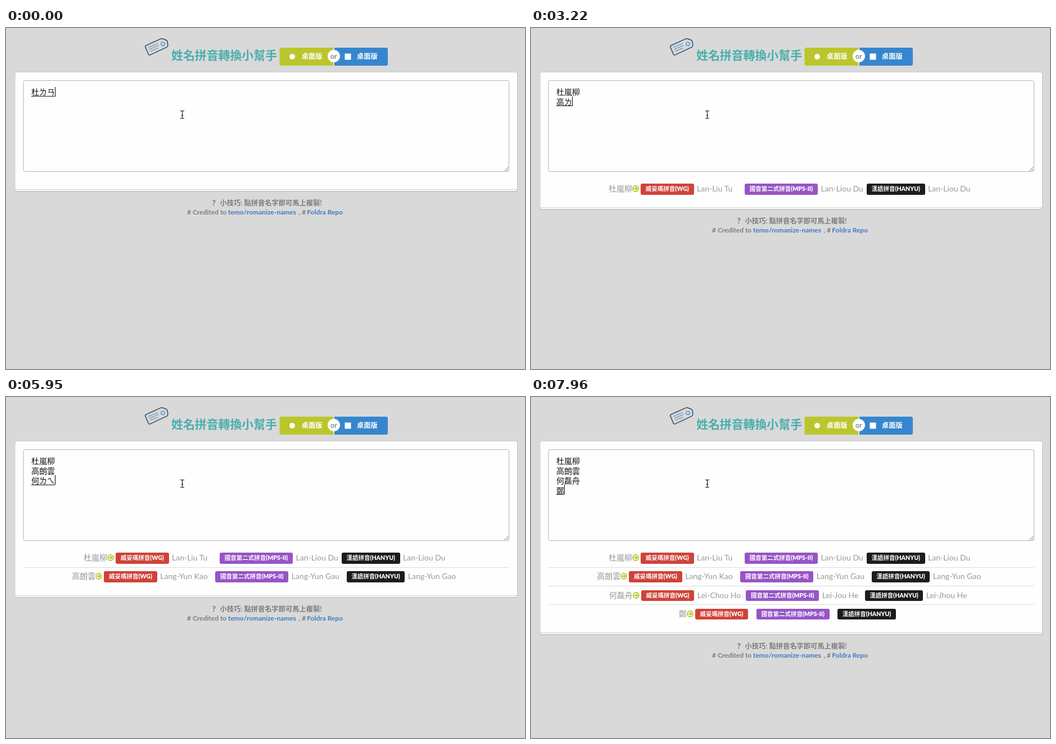
An HTML page for the animation above (8 s loop, 923 by 607 pixels).

```html
<!DOCTYPE html>
<html lang="zh-Hant">
<head>
<meta charset="utf-8">
<title>姓名拼音轉換小幫手</title>
<style>
html, body { margin: 0; width: 100%; height: 100%; overflow: hidden; background: #d9d9d9; }
body, text { font-family: Lato, "Noto Sans CJK TC", "Noto Sans CJK JP", "Noto Sans CJK", sans-serif; }
svg { display: block; }
#stage { position: absolute; left: 0; top: 0; }
.title { font-size: 20.9px; font-weight: 700; fill: #4aafab; }
.button { font-size: 12.25px; font-weight: 700; fill: #fff; }
.or { font-size: 12.25px; font-weight: 700; fill: #8a8a8a; text-anchor: middle; }
.foot { font-size: 12.25px; font-weight: 700; fill: #7d7d7d; }
.credit { font-size: 12px; }
.link { fill: #4179c2; }
#typed text { font-size: 14px; fill: #111; }
.row {
  position: absolute; left: 31px; width: 864px; height: 33px;
  display: flex; justify-content: center; align-items: center;
  font-size: 14px; line-height: 20px; color: #999; white-space: pre;
}
.row + .row::before {
  content: ""; position: absolute; left: 0; right: 0; top: 0; height: 1px; background: #dcdcdc;
}
.row svg { width: 12px; height: 12px; margin-right: 3px; flex: none; }
.tag {
  flex: none; height: 19.5px; margin-top: 1.5px; border-radius: 3px; color: #fff;
  font-size: 10.5px; line-height: 19.5px; font-weight: 900; text-align: center;
}
.roman { flex: none; margin: 0 9px 0 5.5px; }
</style>
</head>
<body>
<svg id="stage" width="923" height="607" viewBox="0 0 923 607">
  <!-- price tag -->
  <g fill="none" stroke-linecap="round" stroke-linejoin="round">
    <path d="M249 31.2 L274.5 19.6 Q276.8 18.5 279 19.3 L284.8 21.5 Q286.8 22.4 287.1 24.4 L287.8 30.3 Q288 33 285.8 34.1 L256.5 47.9 Q254.3 48.9 253.3 46.7 L247.9 34.1 Q247.2 32 249 31.2 Z"
      stroke="#34495e" stroke-width="1.5"/>
    <g stroke="#4b94cf" stroke-width="1.1">
      <path d="M253.5 34.5 L269.5 27.5 M255 38 L271.5 30.8 M256.7 41.5 L270 35.7"/>
      <circle cx="279" cy="28.3" r="3.2" stroke-width="1.4"/>
    </g>
  </g>
  <text class="title" x="294" y="55.7">姓名拼音轉換小幫手</text>

  <!-- buttons -->
  <rect x="581" y="35" width="4" height="32" fill="#e3e6bd"/>
  <path d="M582 35 H489.5 a3 3 0 0 0 -3 3 V64 a3 3 0 0 0 3 3 H582 Z" fill="#bbc62c"/>
  <path d="M584 35 H676 a3 3 0 0 1 3 3 V64 a3 3 0 0 1 -3 3 H584 Z" fill="#3686cf"/>
  <circle cx="509" cy="51" r="5" fill="#fff"/>
  <rect x="602.5" y="45.5" width="11" height="11" fill="#fff"/>
  <text class="button" x="525.8" y="55.2">桌面版</text>
  <text class="button" x="624" y="55.2">桌面版</text>
  <circle cx="583" cy="50" r="11" fill="#fff"/>
  <text class="or" x="582.7" y="54.6">or</text>

  <!-- panel -->
  <rect id="shade" x="16" y="78.5" width="894" rx="3" fill="#c2c2c2"/>
  <rect id="panel" x="16.5" y="79" width="892.5" rx="3" fill="#fefefe"/>
  <rect id="seam" x="17" width="892" height="1" fill="#cfcfcf"/>
  <rect x="31" y="93.5" width="863.5" height="162" rx="3" fill="#fefefe" stroke="#b4b4b4"/>
  <path d="M886.5 254.5 L893.5 247.5 M890.5 254.5 L893.5 251.5" stroke="#777" fill="none"/>
  <g id="typed"></g>
  <rect id="underline" x="45" height="1" fill="#111"/>
  <rect id="caret" width="1" height="17" fill="#000"/>

  <!-- mouse pointer -->
  <path d="M310 147.5 h2.2 l1.3 1 l1.3 -1 h2.2 M313.5 148.5 V160 M310 161 h2.2 l1.3 -1 l1.3 1 h2.2 M311.8 155.5 h3.4"
    fill="none" stroke="#111" stroke-width="1.1"/>

  <g id="footer">
    <text class="foot" x="366.5" y="25.8" style="font-weight:900;font-size:13.5px">?</text>
    <text class="foot" x="380.5" y="25.8">小技巧: 點拼音名字即可馬上複製!</text>
    <g class="foot credit">
      <text x="322" y="42.2"># Credited to</text>
      <text class="link" x="395" y="42.2">temo/romanize-names</text>
      <text x="520.5" y="42.2">, #</text>
      <text class="link" x="535.3" y="42.2">Foldra Repo</text>
    </g>
  </g>
</svg>
<div id="rows"></div>

<script>
const LOOP = 8000;
const TAGS = [
  ['威妥瑪拼音(WG)', '#cf4339', 94.5],
  ['國音第二式拼音(MPS-II)', '#9754c6', 130],
  ['漢語拼音(HANYU)', '#1b1c1d', 103.5],
];
// full name, romanizations, column widths of a finished row
const NAMES = [
  ['杜嵐柳', ['Lan-Liu Tu', 'Lan-Liou Du', 'Lan-Liou Du'], [76, 72.5, 73]],
  ['高朗雲', ['Lang-Yun Kao', 'Lang-Yun Gau', 'Lang-Yun Gao'], [89, 89, 85]],
  ['何磊舟', ['Lei-Chou Ho', 'Lei-Jou He', 'Lei-Jhou He'], [77.5, 67, 75.5]],
  ['鄭', ['', '', ''], []],
];
// time, line, committed text, composing text, characters in the result row, caret hidden
const STEPS = [
  [0, 0, '', '杜ㄌㄢ', 0],
  [180, 0, '', '杜ㄌㄢ', 0, true],
  [330, 0, '', '杜嵐', 0],
  [420, 0, '', '杜嵐', 2],
  [960, 0, '杜嵐', '', 2],
  [1220, 0, '杜嵐', 'ㄌ一', 0],
  [1400, 0, '杜嵐', 'ㄌ一ㄡ', 0],
  [1520, 0, '杜嵐', '柳', 3],
  [2060, 0, '杜嵐柳', '', 3],
  [2240, 1, '', '', 0],
  [2770, 1, '', 'ㄍ', 0],
  [2860, 1, '', 'ㄍㄠ', 0],
  [2950, 1, '', '高', 0],
  [3040, 1, '', '高', 1],
  [3220, 1, '', '高ㄌ', 0],
  [3490, 1, '', '高ㄌㄤ', 0],
  [3610, 1, '', '高朗', 2],
  [3880, 1, '', '高朗ㄩ', 0],
  [3970, 1, '', '高朗ㄩㄣ', 0],
  [4050, 1, '', '高朗雲', 3],
  [4320, 1, '高朗雲', '', 3],
  [4620, 2, '', '', 0],
  [4880, 2, '', 'ㄏ', 0],
  [4970, 2, '', 'ㄏㄜ', 0],
  [5050, 2, '', '何', 1],
  [5590, 2, '', '何', 1, true],
  [5770, 2, '', '何ㄌ', 1],
  [5860, 2, '', '何ㄌ', 0],
  [5950, 2, '', '何ㄌㄟ', 0],
  [6210, 2, '', '何磊', 2],
  [6570, 2, '', '何磊ㄓ', 0],
  [6780, 2, '', '何磊ㄓㄡ', 0],
  [6900, 2, '', '何磊舟', 3],
  [7070, 2, '何磊舟', '', 3],
  [7520, 3, '', '', 0],
  [7700, 3, '', 'ㄓ', 0],
  [7790, 3, '', 'ㄓㄥ', 0],
  [7960, 3, '', '鄭', 1],
];
const ARROW = `<svg viewBox="0 0 12 12" fill="none" stroke="#bbc62c" stroke-width="1.8">
  <circle cx="6" cy="6" r="5"/><path d="M2.8 6 H8.4 M6 3.4 L8.6 6 L6 8.6"/></svg>`;

const $ = id => document.getElementById(id);
function set(id, attrs) {
  for (const key in attrs) $(id).setAttribute(key, attrs[key]);
}

function romanized(text, size) {
  if (size < 2) return '';
  return size === 2 ? text.replace(/-\w+/, '') : text;
}

function rowHtml(line, size) {
  const [name, romans, widths] = NAMES[line];
  const cells = TAGS.map(([label, color, width], i) => {
    const slot = size === 3 ? `width:${widths[i]}px` : '';
    return `<span class="tag" style="background:${color};width:${width}px">${label}</span>` +
      `<span class="roman" style="${slot}">${romanized(romans[i], size)}</span>`;
  });
  const top = 269.5 + 33.3 * line;
  return `<div class="row" style="top:${top}px">${name.slice(0, size)}${ARROW}${cells.join('')}</div>`;
}

function draw([, line, done, composing, size, hidden]) {
  const lines = NAMES.slice(0, line).map(n => n[0]).concat(done + composing);
  $('typed').innerHTML = lines
    .map((s, i) => `<text x="45" y="${119 + 17.5 * i}">${s}</text>`).join('');
  set('underline', {
    x: 45 + 14 * done.length,
    y: Math.round(121 + 17.4 * line),
    width: 14 * composing.length,
  });
  set('caret', {
    x: 45 + 14 * (done + composing).length,
    y: Math.floor(105 + 17.3 * line),
    visibility: hidden ? 'hidden' : 'visible',
  });

  const sizes = NAMES.slice(0, line).map(n => n[0].length);
  if (size) sizes.push(size);
  $('rows').innerHTML = sizes.map((n, i) => rowHtml(i, n)).join('');

  const bottom = sizes.length ? Math.round(289 + 33.3 * sizes.length) : 290;
  set('panel', { height: bottom - 79 });
  set('shade', { height: bottom - 77 });
  set('seam', { y: bottom - 3 });
  set('footer', { transform: `translate(0 ${bottom - 0.2})` });
}

let shown = -1;
function tick() {
  const time = performance.now() % LOOP;
  const index = STEPS.filter(step => step[0] <= time).length - 1;
  if (index !== shown) draw(STEPS[shown = index]);
  requestAnimationFrame(tick);
}
tick();
</script>
</body>
</html>
```
